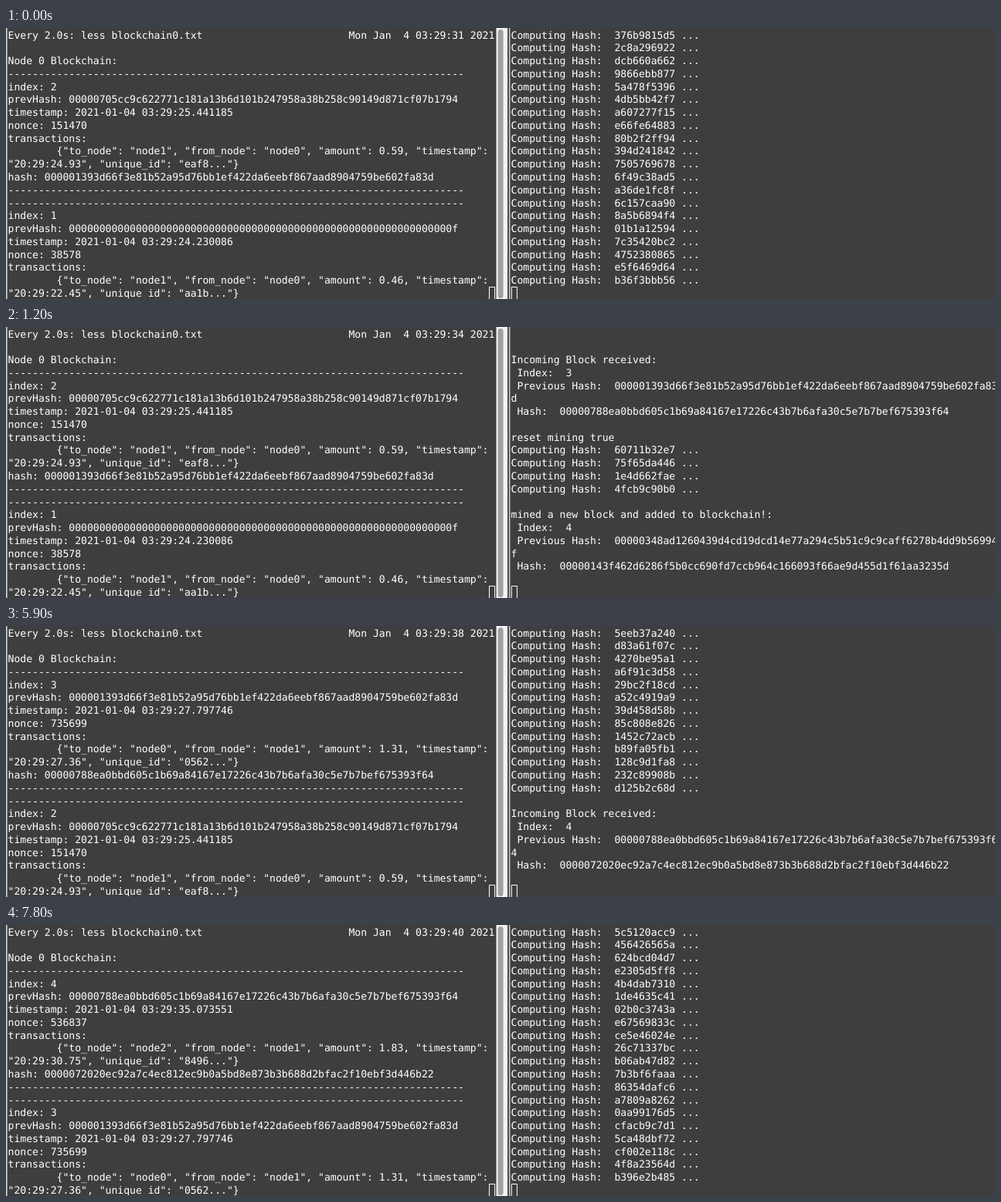
An HTML page that plays this animation: 1280 px wide and 352 px high, repeating every 8000 ms.

```html
<!DOCTYPE html>
<html lang="en">
<head>
<meta charset="utf-8">
<title>Blockchain terminals</title>
<style>
  html, body { margin: 0; width: 100%; height: 100%; overflow: hidden; background: #3e3e3e; }
  svg { display: block; width: 1280px; height: 352px; }
  text {
    font: 13.14px "DejaVu Sans Mono", monospace;
    letter-spacing: -0.03px;
    fill: #fff;
    white-space: pre;
    text-rendering: geometricPrecision;
  }
  .cursor { fill: none; stroke: #fff; stroke-width: 1; }
</style>
</head>
<body>
<svg viewBox="0 0 1280 352">
  <rect width="1280" height="352" fill="#3e3e3e"/>
  <rect width="1.6" height="352" fill="#d6d6d6"/>
  <g id="left"></g>
  <rect x="2" y="351" width="632" height="1" fill="#3e3e3e"/>
  <g id="right"></g>
  <rect x="634.5" width="14.5" height="352" fill="#f4f4f4"/>
  <rect x="636.6" y="2" width="7" height="349" rx="3.5" fill="#a0a0a0"/>
  <rect x="649" width="1.9" height="352" fill="#4a4a4a"/>
  <rect x="650.9" width="1.6" height="352" fill="#c4c4c4"/>
  <path class="cursor" d="M625.5 353V336.5H632.6V353"/>
  <path class="cursor" d="M654.3 353V336.5H661.4V353"/>
</svg>
<script>
const LOOP = 8000, COLS = 80, ROW = 16.77, BASE = 13.5;

const hash = {
  zero: "0".repeat(63) + "f",
  one: "00000705cc9c622771c181a13b6d101b247958a38b258c90149d871cf07b1794",
  two: "000001393d66f3e81b52a95d76bb1ef422da6eebf867aad8904759be602fa83d",
  three: "00000788ea0bbd605c1b69a84167e17226c43b7b6afa30c5e7b7bef675393f64",
  rival: "00000348ad1260439d4cd19dcd14e77a294c5b51c9c9caff6278b4dd9b56994f",
  mined: "00000143f462d6286f5b0cc690fd7ccb964c166093f66ae9d455d1f61aa3235d",
  four: "0000072020ec92a7c4ec812ec9b0a5bd8e873b3b688d2bfac2f10ebf3d446b22"
};

// Left terminal: the two newest blocks and a clock.
const block = (index, prev, own, time, nonce, to, from, amount, sent, id) => [
  "index: " + index,
  "prevHash: " + prev,
  "timestamp: 2021-01-04 03:29:" + time,
  "nonce: " + nonce,
  "transactions:",
  `        {"to_node": "node${to}", "from_node": "node${from}", "amount": ${amount}, "timestamp":`,
  `"20:29:${sent}", "unique_id": "${id}..."}`,
  "hash: " + own
];
const chain = [
  block(1, hash.zero, hash.one, "24.230086", 38578, 1, 0, "0.46", "22.45", "aa1b"),
  block(2, hash.one, hash.two, "25.441185", 151470, 1, 0, "0.59", "24.93", "eaf8"),
  block(3, hash.two, hash.three, "27.797746", 735699, 0, 1, "1.31", "27.36", "0562"),
  block(4, hash.three, hash.four, "35.073551", 536837, 2, 1, "1.83", "30.75", "8496")
];
const rule = "-".repeat(75);

// [start ms, clock seconds, index of the newest block in chain]
const watch = [[0, 31, 1], [100, 34, 1], [2300, 36, 2], [5300, 38, 2], [6300, 40, 3]];

function leftLines([, sec, top]) {
  const head = "Every 2.0s: less blockchain0.txt";
  const date = `Mon Jan  4 03:29:${sec} 2021`;
  return [head + date.padStart(COLS - head.length), "", "Node 0 Blockchain:",
    rule, ...chain[top], rule, rule, ...chain[top - 1]];
}

// Right terminal: a scrolling log.
const work = list => list.split(" ").map(h => `Computing Hash:  ${h} ...`);
const wrap = line => [line.slice(0, COLS), line.slice(COLS)];
const report = (title, index, prev, own) =>
  ["", title, " Index:  " + index, ...wrap(" Previous Hash:  " + prev), " Hash:  " + own, ""];
const incoming = (...args) => report("Incoming Block received:", ...args);
const reset = "reset mining true";

// [ms, lines added to the log at that time]
const feed = [
  [0, work("376b9815d5 2c8a296922 dcb660a662 9866ebb877 5a478f5396 4db5bb42f7 a607277f15 " +
    "e66fe64883 80b2f2ff94 394d241842 7505769678 6f49c38ad5 a36de1fc8f 6c157caa90 " +
    "8a5b6894f4 01b1a12594 7c35420bc2 4752380865 e5f6469d64 b36f3bbb56")],
  [100, work("3e2ed84e69 d9696df25d f701089597 5f3afc8ab3")],
  [200, work("60ef77c2b9 d6cf83e923 b8e0025ed6 a9557c27bd")],
  [500, work("355d56fd25 ebc901eb4f f196bfe33b 98f42b088f cac4614b03")],
  [700, [...work("7be10c94d2 c03f5a81e6 19d7e2b04a"), ...incoming(3, hash.two, hash.rival)]],
  [800, [reset, ...report("Received Block added to Blockchain:", 3, hash.two, hash.rival)]],
  [900, [...incoming(3, hash.two, hash.three), reset, ...work("60711b32e7")]],
  [1000, work("75f65da446")],
  [1100, work("1e4d662fae")],
  [1200, [...work("4fcb9c90b0"),
    ...report("mined a new block and added to blockchain!:", 4, hash.rival, hash.mined)]],
  [5300, work("189580f7d3 7d87f643aa eaef20859a 2cee158161 14e7aa1433 cdfcd9e830 c44ce66537 " +
    "b63fee2b2b 9fbb711058 6481527034 e3f28c8dd1 b194462cc8 b9befe63f1 fb8c91972c " +
    "1e5eaeffc4 e95ce78cf9 6bc0950987 a01963ed42 f3eb4278a0 5eeb37a240")],
  [5400, work("d83a61f07c 4270be95a1 a6f91c3d58 29bc2f18cd a52c4919a9")],
  [5600, work("39d458d58b 85c808e826 1452c72acb b89fa05fb1 128c9d1fa8")],
  [5900, [...work("232c89908b d125b2c68d"), ...incoming(4, hash.three, hash.four)]],
  [6000, [reset, ...work("1f530f14d4")]],
  [6100, work("8418ddfd5d")],
  [6300, work("159b060fbe")],
  [6700, work("e07b3c92f5 5d18a4c6b0 93f2607ead 0c6e81d54b b7a925f31e")],
  [7000, work("5c5120acc9 456426565a 624bcd04d7 e2305d5ff8 4b4dab7310")],
  [7100, work("1de4635c41 02b0c3743a e67569833c ce5e46024e 26c71337bc")],
  [7600, work("b06ab47d82 7b3bf6faaa 86354dafc6 a7809a8262 0aa99176d5")],
  [7800, work("cfacb9c7d1 5ca48dbf72 cf002e118c 4f8a23564d b396e2b485")]
];

function makeScreen(id, x, count) {
  const group = document.getElementById(id);
  const rows = Array.from({ length: count }, (_, i) => {
    const row = document.createElementNS("http://www.w3.org/2000/svg", "text");
    row.setAttribute("x", x);
    row.setAttribute("y", BASE + i * ROW);
    row.setAttribute("xml:space", "preserve");
    return group.appendChild(row);
  });
  return lines => rows.forEach((row, i) => {
    const line = lines[i] || "";
    if (row.textContent !== line) row.textContent = line;
  });
}

const showLeft = makeScreen("left", 2.6, 21);
const showRight = makeScreen("right", 653.6, 20);

function draw(t) {
  const past = ([start]) => start <= t;
  showLeft(leftLines(watch.filter(past).pop()));
  showRight(feed.filter(past).flatMap(([, lines]) => lines).slice(-20));
}

const begin = performance.now();
function tick() {
  draw((performance.now() - begin) % LOOP);
  requestAnimationFrame(tick);
}
tick();
</script>
</body>
</html>
```
